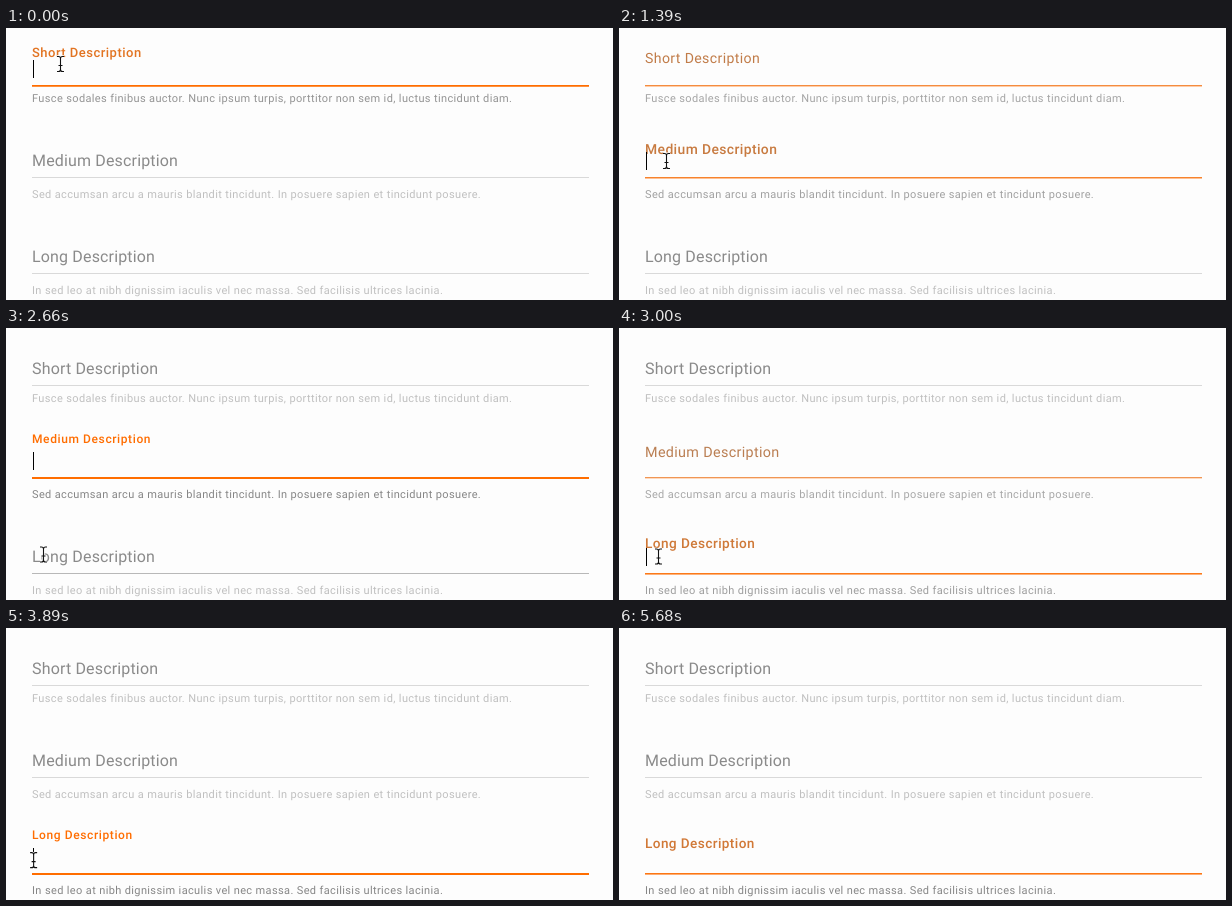
Animation, 607 px wide and 272 px high, one loop 5780 ms. Source, as an HTML page:

```html
<!DOCTYPE html>
<html lang="en">
<head>
<meta charset="utf-8">
<title>Floating labels</title>
<style>
  html, body { margin: 0; width: 100%; height: 100%; overflow: hidden; background: #fdfdfd; }
  svg { display: block; width: 100%; height: 100%; }
  text { font-family: Roboto, sans-serif; text-rendering: geometricPrecision; white-space: pre; }
  .help { font-size: 11px; letter-spacing: .0333em; }
</style>
</head>
<body>
<svg id="stage" viewBox="0 0 607 272"></svg>
<script>
const LOOP = 5780;
const LABEL_GREY = [138, 138, 138], ORANGE = [255, 109, 0];
const HELP_REST = [192, 192, 192], HELP_FOCUS = [134, 134, 134];
const FIRST_SWITCH = 1235, SECOND_SWITCH = 2833, BLUR = 5680, DURATION = 429;

// Spans in which the picture moves; it rests between them.
const SPANS = [[0, 110], [350, 350], [520, 1090], [1150, 1620], [1800, 2370],
  [2420, 2940], [3000, 3240], [3420, 3420], [3890, 4070], [4430, 4430],
  [4900, 4900], [5380, 5380], [5680, 5680]];
const BLINKS = [350, 830, 1800, 2280, 2760, SECOND_SWITCH, 3420, 3890, 4430, 4900, 5380];

// time, x, y
const POINTER = [[460, 54.5, 36], [640, 54, 46], [960, 49, 119], [1150, 47.5, 133],
  [1740, 47.5, 133], [2100, 30, 175], [2370, 33, 208], [2660, 37.5, 226.5],
  [2840, 39.5, 228.5], [3830, 39.5, 228.5], [4070, -8, 243]];

const FIELDS = [
  { label: "Short Description", line: 57, helpY: 74,
    help: "Fusce sodales finibus auctor. Nunc ipsum turpis, porttitor non sem id, luctus tincidunt diam." },
  { label: "Medium Description", line: 149, helpY: 170,
    help: "Sed accumsan arcu a mauris blandit tincidunt. In posuere sapien et tincidunt posuere." },
  { label: "Long Description", line: 245, helpY: 266,
    help: "In sed leo at nibh dignissim iaculis vel nec massa. Sed facilisis ultrices lacinia." }
];

const stage = document.getElementById("stage");

function add(tag, attrs, parent = stage) {
  const node = document.createElementNS("http://www.w3.org/2000/svg", tag);
  set(node, attrs);
  parent.appendChild(node);
  return node;
}

function set(node, attrs) {
  for (const key in attrs) node.setAttribute(key, attrs[key]);
}

const mix = (a, b, p) => a + (b - a) * p;
const blend = (a, b, p) => `rgb(${a.map((v, i) => Math.round(mix(v, b[i], p)))})`;

// cubic-bezier(.4, 0, .2, 1)
function ease(x) {
  if (x <= 0) return 0;
  if (x >= 1) return 1;
  let lo = 0, hi = 1;
  for (let i = 0; i < 24; i++) {
    const u = (lo + hi) / 2, v = 1 - u;
    if (1.2 * v * v * u + .6 * v * u * u + u * u * u < x) lo = u; else hi = u;
  }
  return 3 * (1 - lo) * lo * lo + lo * lo * lo;
}

function hold(t) {
  const [from, to] = SPANS.filter(span => span[0] <= t).pop();
  return t >= to ? to : from + Math.floor((t - from) / 60) * 60;
}

const since = (t, start) => ease((t - start) / DURATION);

function focusLevels(t) {
  const first = since(t, FIRST_SWITCH), second = since(t, SECOND_SWITCH);
  return [
    t < FIRST_SWITCH ? ease((t + 102) / 212) : 1 - first,
    t < SECOND_SWITCH ? first : 1 - second,
    t < BLUR ? second : .61
  ];
}

function pointerAt(t) {
  const next = POINTER.findIndex(point => point[0] > t);
  if (next === 0) return POINTER[0].slice(1);
  if (next < 0) return POINTER[POINTER.length - 1].slice(1);
  const a = POINTER[next - 1], b = POINTER[next];
  const p = (t - a[0]) / (b[0] - a[0]);
  return [mix(a[1], b[1], p), mix(a[2], b[2], p)];
}

for (const field of FIELDS) {
  field.rule = add("rect", { x: 26, y: field.line, width: 557, height: 1 });
  field.bar = add("rect", { x: 26, y: field.line, width: 557, fill: "#ff6d00" });
  field.labelNode = add("text", { x: 26 });
  field.labelNode.textContent = field.label;
  field.helpNode = add("text", { x: 26, y: field.helpY, class: "help" });
  field.helpNode.textContent = field.help;
}

const caret = add("rect", { x: 27, width: 1, height: 18, fill: "#000" });
const pointer = add("g", { fill: "none" });
const BEAM = "M-3.5-7.5H-2Q0-7.5 0-5.5Q0-7.5 2-7.5H3.5M0-5.5V5.5M-3.5 7.5H-2Q0 7.5 0 5.5Q0 7.5 2 7.5H3.5M-2 1.5H2";
add("path", { d: BEAM, stroke: "#fff", "stroke-width": 2.4 }, pointer);
add("path", { d: BEAM, stroke: "#111", "stroke-width": 1.1 }, pointer);

function draw(time) {
  const t = hold(time);
  const levels = focusLevels(t);
  const active = t < FIRST_SWITCH ? 0 : t < SECOND_SWITCH ? 1 : 2;
  const hovered = t >= 2420 && t < SECOND_SWITCH ? 2 : -1;

  FIELDS.forEach((field, i) => {
    const p = levels[i];
    set(field.labelNode, {
      y: field.line - mix(11, 34, p),
      "font-size": mix(16, 12, p),
      "letter-spacing": mix(.16, .6, p),
      "font-weight": i === active ? 500 : 400,
      fill: blend(LABEL_GREY, ORANGE, p)
    });
    set(field.rule, { fill: i === hovered ? "#b8b8b8" : "#d9d9d9" });
    set(field.bar, { height: 1 + p, opacity: Math.min(1, 1.5 * p) });
    set(field.helpNode, { fill: blend(HELP_REST, HELP_FOCUS, i === 2 && t >= BLUR ? 1 : p) });
  });

  const blinks = BLINKS.filter(at => at <= t).length;
  set(caret, { y: FIELDS[active].line - 25, opacity: blinks % 2 ? 0 : 1 });
  set(pointer, { transform: `translate(${pointerAt(t)})`, opacity: t < 4070 ? 1 : 0 });
}

const begin = performance.now();
function tick() {
  draw((performance.now() - begin) % LOOP);
  requestAnimationFrame(tick);
}
tick();
</script>
</body>
</html>
```
